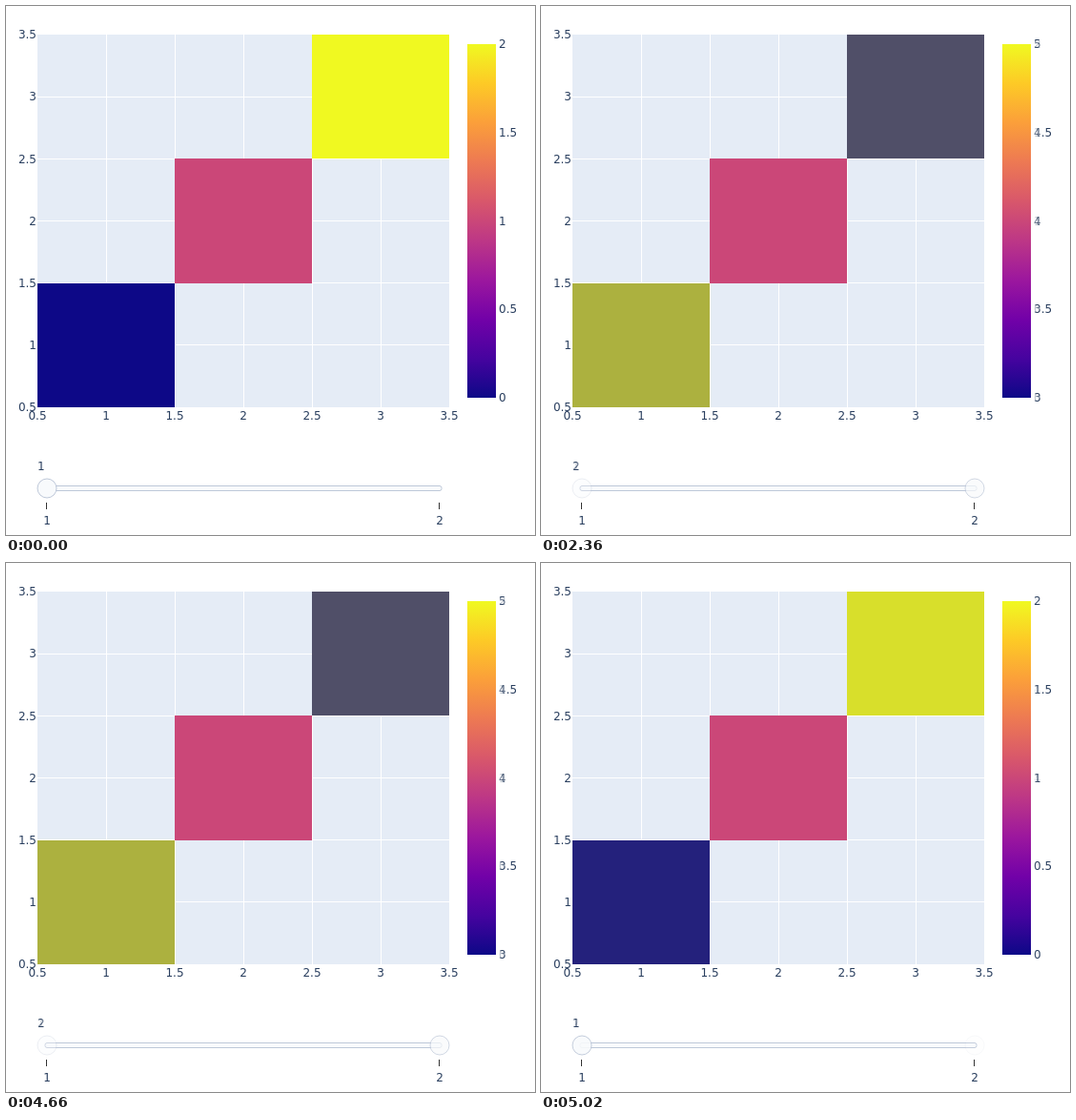
An HTML page that plays this animation: 555 px wide and 555 px high, repeating every 5080 ms.

```html
<!DOCTYPE html>
<html lang="en">
<head>
<meta charset="utf-8">
<title>Heatmap with slider</title>
<style>
  html, body { margin: 0; width: 100%; height: 100%; overflow: hidden; background: #fff; }
  svg { display: block; }
  text { font: 12px "DejaVu Sans", Verdana, sans-serif; fill: #2a3f5f; }
  .crisp { shape-rendering: crispEdges; }
  .control { fill: #f8fafc; stroke: #bec8d9; }
</style>
</head>
<body>
<svg id="stage" width="555" height="555" viewBox="0 0 555 555"></svg>
<script>
const NS = "http://www.w3.org/2000/svg";
const stage = document.getElementById("stage");
const PLASMA = ["#0d0887", "#46039f", "#7201a8", "#9c179e", "#bd3786",
                "#d8576b", "#ed7953", "#fb9f3a", "#fdca26", "#f0f921"];
const LOW = PLASMA[0], MID = "#cb4778", HIGH = PLASMA[9];
const LEFT = 33, TOP = 30, RIGHT = 465, BOTTOM = 421;

function add(parent, tag, attrs) {
  const node = document.createElementNS(NS, tag);
  for (const key in attrs) node.setAttribute(key, attrs[key]);
  return parent.appendChild(node);
}

function rect(parent, x, y, width, height, fill) {
  return add(parent, "rect", { x, y, width, height, fill, class: "crisp" });
}

function label(parent, value, x, y, anchor = "start") {
  add(parent, "text", { x, y, "text-anchor": anchor }).textContent = value;
}

const gradient = add(add(stage, "defs"), "linearGradient", { id: "plasma", x1: 0, y1: 1, x2: 0, y2: 0 });
PLASMA.forEach((color, i) => add(gradient, "stop", { offset: i / 9, "stop-color": color }));

function drawAxes(g) {
  rect(g, LEFT, TOP, RIGHT - LEFT, BOTTOM - TOP, "#e5ecf6");
  for (let i = 0; i <= 6; i++) {
    const x = LEFT + (RIGHT - LEFT) * i / 6;
    const y = BOTTOM - (BOTTOM - TOP) * i / 6;
    const value = 0.5 + i / 2;
    if (i > 0 && i < 6) {
      add(g, "path", {
        d: `M${x},${TOP}V${BOTTOM}M${LEFT},${y}H${RIGHT}`,
        stroke: "#fff", class: "crisp"
      });
    }
    label(g, value, x, 434, "middle");
    label(g, value, 32, y + 4.2, "end");
  }
}

function drawSlider(g, step) {
  label(g, step, 33, 487);
  add(g, "rect", { x: 41, y: 503.5, width: 416, height: 5, rx: 2, class: "control" });
  [43, 455].forEach((x, i) => {
    rect(g, x - 1, 521, 1, 7, "#333");
    label(g, i + 1, x, 544, "middle");
  });
  add(g, "circle", { cx: step === 1 ? 43 : 455, cy: 506, r: 10, class: "control" });
}

// A complete opaque view, so that two views can be cross-faded.
function drawView(step, base, colors) {
  const g = add(stage, "g");
  rect(g, 0, 0, 555, 555, "#fff");
  drawAxes(g);
  rect(g, 33, 291, 144, 130, colors[0]);
  rect(g, 177, 160, 144, 131, colors[1]);
  rect(g, 321, 30, 144, 130, colors[2]);
  rect(g, 484, 40, 30, 371, "url(#plasma)");
  for (let i = 0; i <= 4; i++) label(g, base + i / 2, 517, 411 - 371 * i / 4 + 4.2);
  drawSlider(g, step);
  return g;
}

drawView(1, 0, [LOW, MID, HIGH]);
const second = drawView(2, 3, [HIGH, MID, LOW]);

const HOLD = 2000, STEP = 60, HALF = 2540, LOOP = 2 * HALF;

// Hold, then nine equal steps of a tenth each.
function mix(t) {
  const local = t % HALF;
  const fade = local < HOLD ? 0 : (Math.floor((local - HOLD) / STEP) + 1) / 10;
  return t < HALF ? fade : 1 - fade;
}

const start = performance.now();
function frame() {
  second.setAttribute("opacity", mix((performance.now() - start) % LOOP));
  requestAnimationFrame(frame);
}
frame();
</script>
</body>
</html>
```
